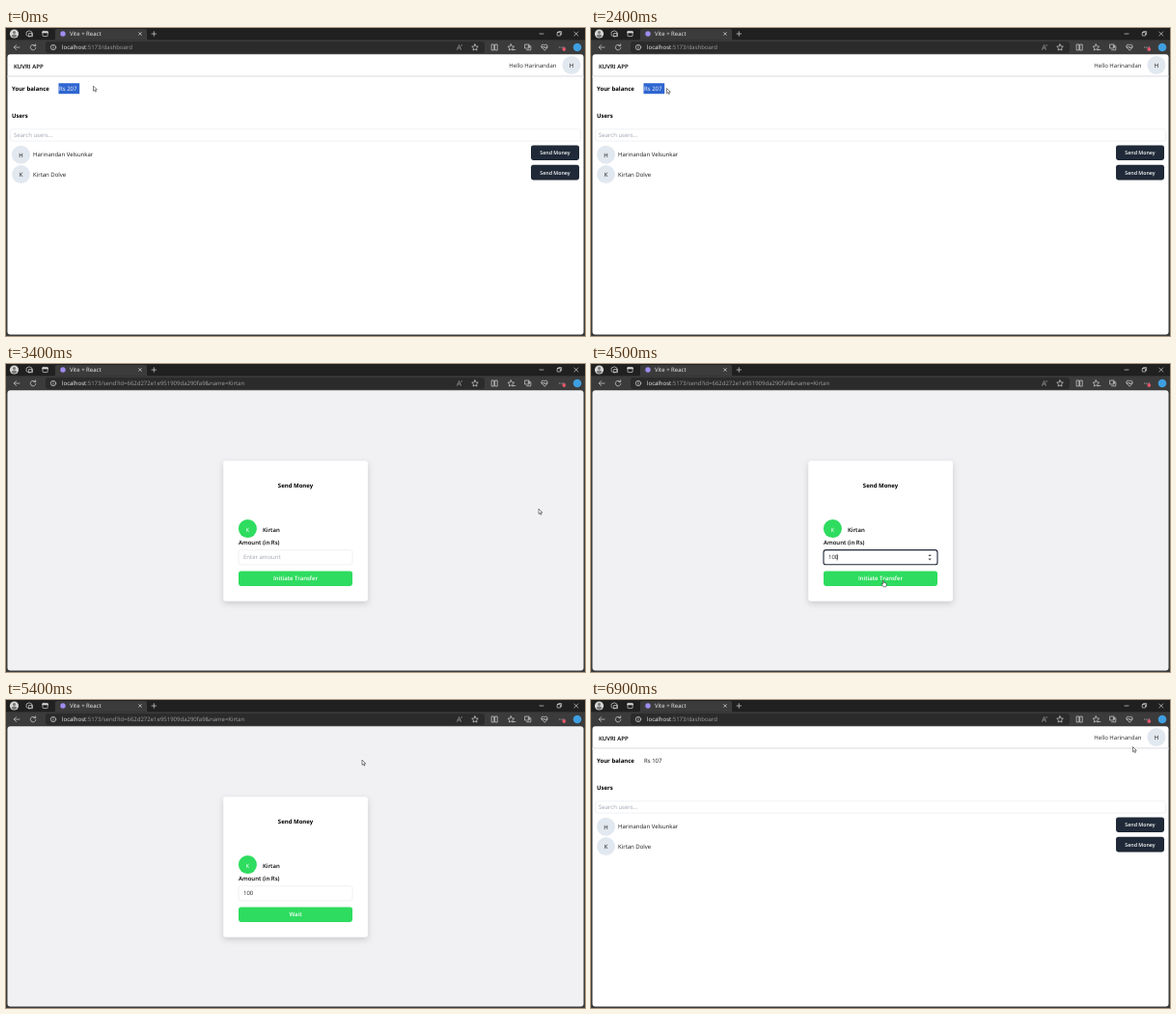
An HTML page that plays this animation: 600 by 319 pixels, repeating every 7000 ms.

```html
<!DOCTYPE html>
<html lang="en">
<head>
<meta charset="utf-8">
<title>Send money demo</title>
<style>
  html, body { margin: 0; height: 100%; overflow: hidden; background: #3b3b3b; }
  svg { display: block; width: 100vw; height: 100vh; }
  text { font-family: "Open Sans", "Noto Sans", sans-serif; font-size: 6px; text-rendering: geometricPrecision; white-space: pre; }
  .b { font-weight: 700; }
  .s { font-weight: 600; }
  .mid { text-anchor: middle; }
  .line { fill: none; stroke: #d6d6d6; stroke-width: .7; stroke-linecap: round; stroke-linejoin: round; }
  .muted { fill: #9ca3af; }
  .field { fill: #fff; stroke: #e5e7eb; stroke-width: .6; }
  .field.focus { stroke: #1f2937; stroke-width: 1.1; }
  .btn { fill: #1f2937; }
  .btn.hover { fill: #111827; }
  .small { font-size: 5.3px; }
  .cursor { fill: #fff; stroke: #222; stroke-width: .55; stroke-linejoin: round; }
</style>
</head>
<body>
<svg viewBox="0 0 600 319" preserveAspectRatio="none">
  <defs>
    <filter id="shadow" x="-20%" y="-20%" width="140%" height="150%">
      <feDropShadow dx="0" dy="2.5" stdDeviation="3" flood-opacity=".17"/>
    </filter>
    <filter id="deep" x="-20%" y="-20%" width="140%" height="170%">
      <feDropShadow dx="0" dy="3" stdDeviation="4" flood-opacity=".4"/>
    </filter>
  </defs>

  <!-- browser frame -->
  <rect width="600" height="319" fill="#3b3b3b"/>
  <rect width="600" height="12.3" fill="#202020"/>
  <path d="M49 12.4q2 0 2-2V3q0-2 2-2h91q2 0 2 2v7.4q0 2 2 2z" fill="#3b3b3b"/>
  <circle cx="8.5" cy="6" r="4.6" fill="#d8d6d4"/>
  <circle cx="8.5" cy="4.6" r="1.5" fill="#777"/>
  <path d="M5.6 8.8q.4-2.2 2.9-2.2t2.9 2.2q-2.9 2.2-5.8 0z" fill="#777"/>
  <g class="line">
    <path d="M21.5 4l2.5-1.2 2.8 1.2v3.7L24 9l-2.5-1.3zM24 5.5h3.5v3.2H24z"/>
    <rect x="38" y="3.4" width="5.2" height="5.2" rx=".8"/>
    <path d="M38 4.4h5.2" stroke-width="1.6"/>
    <path d="M137.6 4.6l2.8 2.8m0-2.8l-2.8 2.8M151 6h4.6M153.3 3.7v4.6"/>
    <path d="M553 6h4M588.8 4l4 4m0-4l-4 4"/>
    <rect x="571.2" y="4.6" width="3.4" height="3.4" rx=".4"/>
    <path d="M572.4 4.4v-.8h3.2v3.2h-.8"/>
  </g>
  <circle cx="59" cy="6" r="2.7" fill="#a08cf0"/>
  <text x="66" y="8" font-size="5.1" fill="#f2f2f2">Vite + React</text>
  <rect x="41" y="14" width="455" height="12" rx="3" fill="#2b2b2b"/>
  <rect id="backGlow" x="4" y="14.2" width="14.5" height="11.6" rx="2" fill="#505050"/>
  <g class="line">
    <path d="M14 20H8.3m2.4-2.5L8.2 20l2.5 2.5"/>
    <path d="M30.3 18.3a2.8 2.8 0 1 0 .6 2.2M30.7 16.8v1.8h-1.9"/>
    <circle cx="49" cy="20" r="2.7"/>
    <path d="M49 19.8v1.5M49 18.5v.1"/>
    <path d="M467.5 22.5l2-5 2 5m-3.3-1.6h2.6M472 17.2q.9.8 0 1.6" stroke="#aaa" stroke-width=".6"/>
    <path id="star" d="M486 16.8l1 2.1 2.3.3-1.7 1.6.4 2.3-2-1.1-2 1.1.4-2.3-1.7-1.6 2.3-.3z"/>
    <use href="#star" x="37.3"/>
    <path d="M505.3 17h-2.2v6h2.2zm1.7 0h2.2v6H507zM525.8 22.5h2"/>
    <path d="M538 17h4v4h-4zM539.5 22.8h4.3v-4M541 19h2M542 18v2"/>
    <path d="M558 23l-3-3.1q-.8-2.6 1.5-2.8 1 0 1.5 1 .5-1 1.5-1 2.3.2 1.5 2.8zM555 20h1.7l.8-1 1 2 .6-1h1.7"/>
    <path d="M573.8 20v.1m2.2-.1v.1m2.2-.1v.1" stroke-width="1"/>
  </g>
  <circle cx="578.3" cy="22" r="1.9" fill="#e0566a"/>
  <circle cx="592" cy="20" r="4.3" fill="#3f9fe0"/>
  <text x="58" y="22" font-size="5.4" fill="#f4f4f4">localhost<tspan id="path" fill="#a0a0a0"></tspan></text>
  <rect id="page" x="1.5" y="27.3" width="597" height="290.2" rx="3"/>

  <g id="dash">
    <text class="s" x="8" y="42" font-size="9">KUVRI APP</text>
    <path d="M1.5 49.8h597" stroke="#dcdee2" stroke-width=".9"/>
    <path d="M1.5 50.7h597" stroke="#f1f1f3" stroke-width=".9"/>
    <text x="570.5" y="41" font-size="5.9" fill="#27272a" text-anchor="end">Hello Harinandan</text>
    <text class="b" x="6" y="65.2" font-size="6.7">Your balance</text>
    <rect id="mark" x="54.5" y="57.2" width="21.7" height="11" fill="#2f66d0"/>
    <text id="balance" x="55" y="65.2" font-size="6.6" font-weight="500"></text>
    <text class="b" x="6" y="93.4" font-size="6.7">Users</text>
    <rect class="field" x="4.5" y="104.8" width="591" height="12.2" rx="1.8"/>
    <text class="muted" x="8" y="113" font-size="5.8">Search users...</text>
    <g id="rows"></g>
  </g>

  <g id="send">
    <rect x="225.3" y="100.2" width="149.6" height="145.4" rx="3" fill="#fff" filter="url(#shadow)"/>
    <text class="b mid" x="300" y="127.6" font-size="11.2">Send Money</text>
    <circle cx="250.4" cy="170.5" r="9.5" fill="#2edc5f"/>
    <text class="mid" x="250.4" y="173.9" font-size="9" fill="#fff">K</text>
    <text class="s" x="266" y="174" font-size="8.9">Kirtan</text>
    <text class="s" x="241" y="187" font-size="5.1">Amount (in Rs)</text>
    <rect id="field" class="field" x="241" y="192.6" width="118" height="15.2" rx="2.4"/>
    <text id="amount" x="246" y="202.2" font-size="5.2"></text>
    <path id="caret" d="M255.2 197.2v6.2" stroke="#111" stroke-width=".6"/>
    <path id="spin" d="M349.4 198.9l1.7-2 1.7 2zM349.4 201.6l1.7 2 1.7-2z" fill="#555"/>
    <rect x="241" y="214.4" width="118" height="15.6" rx="2.4" fill="#2edc5f"/>
    <text id="submit" class="s mid" x="300" y="224.2" font-size="5" fill="#fff"></text>
  </g>

  <g id="alert">
    <path d="M212.8 27.2h174.8v45q0 3-3 3H215.800q-3 0-3-3z" fill="#4a4a4a" filter="url(#deep)"/>
    <text class="b" x="219" y="38" font-size="5.1" fill="#fff">localhost:5173 says</text>
    <text x="219" y="49" font-size="4.7" fill="#f0f0f0">Transcation Sucessfull</text>
    <rect x="357" y="57" width="24.400" height="12" rx="1.6" fill="#1268b8"/>
    <text class="b mid" x="369" y="64.9" font-size="5" fill="#fff">OK</text>
  </g>

  <g id="pointer">
    <path id="arrow" class="cursor" d="M0 0v5.3l1.200-1.100.9 1.900.9-.4-.9-1.900h1.700z"/>
    <path id="hand" class="cursor" d="M-.6 0q.6-.6 1.200 0v2l2.100.5q.7.2.6 1l-.5 2.700h-3l-1.700-2.400q-.3-.8.4-.7l.9.6z"/>
    <path id="beam" d="M-1-3H1M0-3V3M-1 3H1" stroke="#222" stroke-width=".6"/>
  </g>
</svg>
<script>
const $ = id => document.getElementById(id);
const LOOP = 7000, STEP = 100;

const avatar = (x, y, letter) =>
  `<circle cx="${x}" cy="${y}" r="9.5" fill="#e2e8f0"/>
   <text class="mid" x="${x}" y="${y + 2.7}" font-size="7.3" fill="#111">${letter}</text>`;

const row = (name, i) => {
  const y = 131 + i * 20.4;
  return avatar(15.5, y + .2, name[0]) +
    `<text x="28" y="${y + 2.2}" font-size="5.9" fill="#18181b">${name}</text>
     <rect id="btn${i}" class="btn" x="544" y="${y - 9.6}" width="50" height="15.6" rx="2.4"/>
     <text class="s mid small" x="569" y="${y + .2}" fill="#fff">Send Money</text>`;
};
$('rows').innerHTML = avatar(586, 38.5, 'H') +
  ['Harinandan Velsunkar', 'Kirtan Dolve'].map(row).join('');

// time, x, y of the pointer tip
const track = [
  [0, 90.5, 60], [600, 90, 61], [1200, 84, 64], [1800, 80, 62], [2400, 78.5, 62.5],
  [2600, 150, 80], [3000, 530, 148], [3200, 552, 150], [3400, 552, 150],
  [3800, 310, 201], [4000, 300, 201], [4200, 301, 204], [4500, 303, 224.5], [4800, 302, 223],
  [5000, 301, 212], [5300, 369, 62], [5400, 369, 62], [5600, 11, 20],
  [5700, 118.5, 89], [6000, 84, 67], [6400, 76, 66], [6600, 130, 78], [6900, 561.5, 48.5], [7000, 562, 48.5]
];

function tip(t) {
  const i = Math.max(1, track.findIndex(p => p[0] >= t));
  const [t0, x0, y0] = track[i - 1], [t1, x1, y1] = track[i];
  const k = (t - t0) / (t1 - t0), e = k * k * (3 - 2 * k);
  return [x0 + (x1 - x0) * e, y0 + (y1 - y0) * e];
}

const show = (id, on) => $(id).style.display = on ? '' : 'none';
const write = (id, text) => { if ($(id).textContent !== text) $(id).textContent = text; };

function draw(t) {
  const within = (a, b) => t >= a && t < b;
  const sending = within(3300, 5700);
  const paid = t >= 4900;
  const focus = within(3900, 4900);
  const [x, y] = tip(t);

  show('dash', !sending);
  show('send', sending);
  show('alert', within(5000, 5400));
  show('backGlow', within(5600, 5800));
  $('page').setAttribute('fill', sending ? '#f1f1f3' : '#fff');
  write('path', sending ? ':5173/send?id=662d272e1e951909da290fa9&name=Kirtan' : ':5173/dashboard');

  show('mark', !paid);
  write('balance', paid ? 'Rs 107' : 'Rs 207');
  $('balance').setAttribute('fill', paid ? '#111' : '#fff');

  const typed = '100'.slice(0, Math.max(0, (t - 4000) / 100));
  write('amount', typed || 'Enter amount');
  $('amount').setAttribute('fill', typed ? '#222' : '#9ca3af');
  $('field').classList.toggle('focus', focus);
  show('caret', focus);
  $('caret').setAttribute('transform', `translate(${(typed.length - 3) * 2.97})`);
  show('spin', focus);
  write('submit', paid ? 'Wait' : 'Initiate Transfer');

  const overSend = !sending && x > 544 && y > 141;
  const overPay = within(4300, 4900) && y > 214;
  const overField = within(3600, 4900) && x < 359 && y > 192 && y < 208;
  $('btn1').classList.toggle('hover', overSend);
  show('hand', overSend || overPay);
  show('beam', overField);
  show('arrow', !(overSend || overPay || overField));
  $('pointer').setAttribute('transform', `translate(${x} ${y})`);
}

function tick() {
  draw(Math.floor(performance.now() % LOOP / STEP) * STEP);
  requestAnimationFrame(tick);
}
tick();
</script>
</body>
</html>
```
